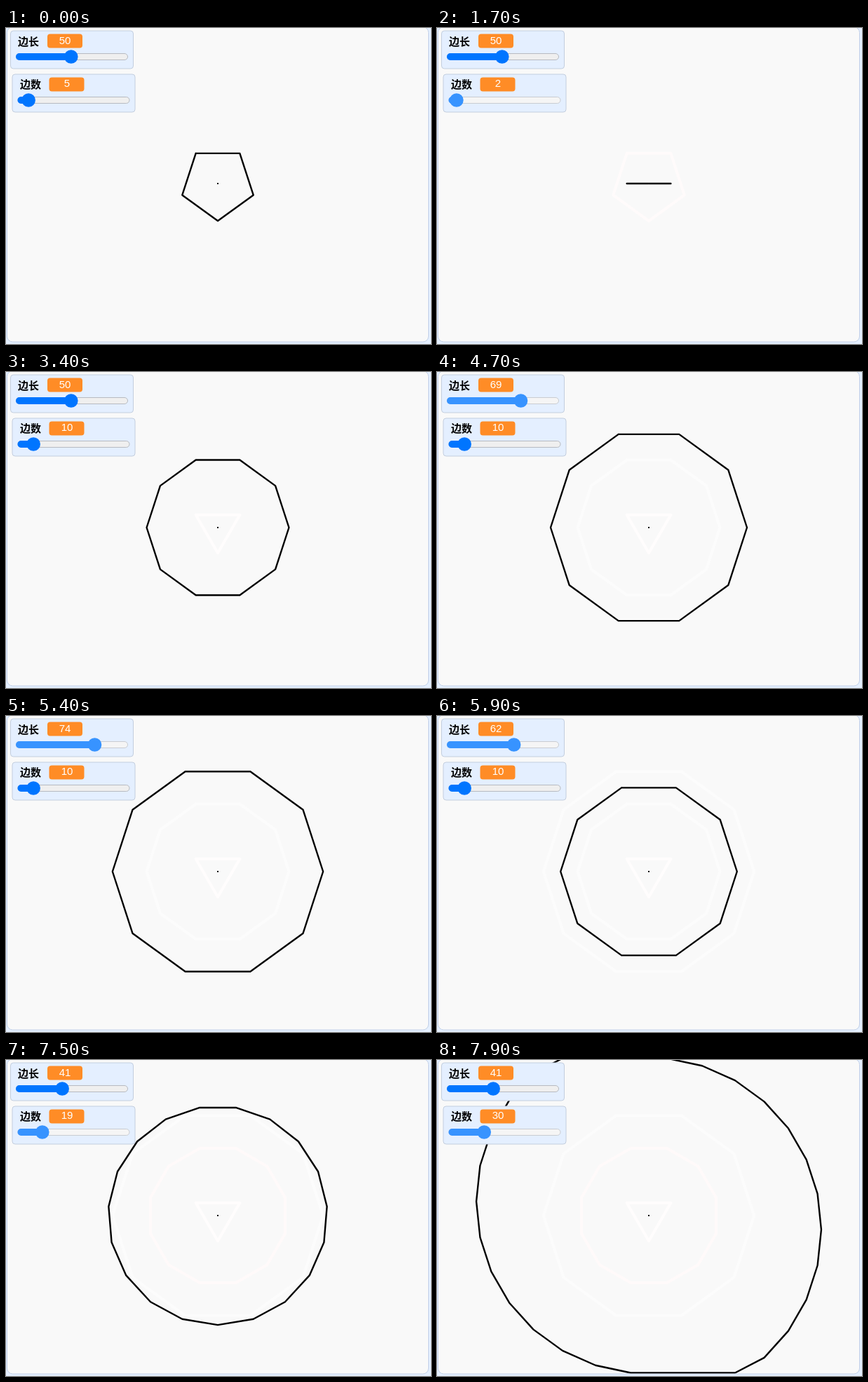
Recreate the animation shown at these times as an HTML page with a canvas. Size 606x451 px, loop 8 s.

```html
<!DOCTYPE html>
<html lang="zh">
<head>
<meta charset="utf-8">
<title>正多边形</title>
<style>
  html, body { margin: 0; width: 606px; height: 451px; overflow: hidden; background: #e5f0ff; }
  body { position: relative; }
  canvas { position: absolute; left: 0; top: 0; }
  .label, .value { position: absolute; line-height: 20px; height: 20px; white-space: nowrap; }
  .label { font: bold 15px/20px "Noto Sans CJK SC", "Noto Sans CJK", sans-serif; color: #000; }
  .value { width: 50px; text-align: center; color: #fff; font: 15px/20px "Liberation Sans", Arial, sans-serif; }
</style>
</head>
<body>
<canvas id="stage" width="606" height="451"></canvas>
<span class="label" style="left:17px;top:9px">边长</span>
<span class="value" id="len" style="left:59px;top:8px">50</span>
<span class="label" style="left:20px;top:70px">边数</span>
<span class="value" id="num" style="left:62px;top:69px">5</span>
<script>
const LOOP = 8000, SCALE = 1.254, CX = 302, CY = 222, FENCE = 179 * SCALE;
const ctx = document.getElementById('stage').getContext('2d');
const lenText = document.getElementById('len');
const numText = document.getElementById('num');

// A run of values, one every 100 ms from the given time
const run = (from, ...values) => values.map((v, i) => [from + i * 100, v]);

const sides = [[0, 5], [1700, 2], ...run(1900, 3, 4, 5), [2600, 7], ...run(2800, 8, 9, 10),
  ...run(7000, 12, 15, 17), ...run(7500, 19, 22, 25, 28, 30)];
const lengths = [[0, 50], ...run(4100, 55, 61, 67), ...run(4700, 69, 71, 73, 75, 77),
  ...run(5400, 74, 71, 69, 67, 65, 62, 57, 52, 47), ...run(6300, 44, 41)];
const lenMode = [[0, 'idle'], [3700, 'hover'], [4100, 'active'], [6400, 'hover'], [6500, 'idle']];
const numMode = [[0, 'idle'], [900, 'hover'], [1700, 'active'], [3300, 'hover'], [3400, 'idle'],
  [6700, 'thumb'], [6900, 'active']];

// Faint traces left on the stage: from, to, sides, length, colour
const traces = [
  [1700, 2100, 5, 50, '#fffbfb'],
  [2000, LOOP, 3, 50, '#fffdfd'],
  [4100, 7000, 10, 50, '#fcfcfc'],
  [5500, LOOP, 10, 74, '#fcfcfc'],
  [7100, LOOP, 12, 41, '#fffafa']
];

const looks = {
  idle: { thumb: '#0075ff', fill: '#0075ff', track: '#efefef', edge: '#b7bac0' },
  hover: { thumb: '#005cc8', fill: '#005cc8', track: '#e5e5e5', edge: '#9fa3aa' },
  active: { thumb: '#3793ff', fill: '#3793ff', track: '#f5f5f5', edge: '#c9ccd1' }
};
looks.thumb = { ...looks.idle, thumb: '#005cc8' };

function at(steps, t) {
  let value = steps[0][1];
  for (const [time, v] of steps) if (time <= t) value = v;
  return value;
}

function box(x, y, w, h, r, fill, stroke) {
  ctx.beginPath();
  ctx.roundRect(x, y, w, h, r);
  if (fill) { ctx.fillStyle = fill; ctx.fill(); }
  if (stroke) { ctx.strokeStyle = stroke; ctx.lineWidth = 1; ctx.stroke(); }
}

// Pen walk, clockwise from the top left; each point is held inside the fence
function polygon(n, length, color, width) {
  const side = length * SCALE, turn = 2 * Math.PI / n;
  const clamp = y => Math.max(CY - FENCE, Math.min(CY + FENCE, y));
  let x = CX - side / 2, y = clamp(CY - side / 2 / Math.tan(Math.PI / n));
  ctx.beginPath();
  ctx.moveTo(x, y);
  for (let i = 0; i < n; i++) {
    x += side * Math.cos(i * turn);
    y = clamp(y + side * Math.sin(i * turn));
    ctx.lineTo(x, y);
  }
  ctx.strokeStyle = color;
  ctx.lineWidth = width;
  ctx.lineCap = ctx.lineJoin = 'round';
  ctx.stroke();
}

function monitor(x, y, w, h, value, mode) {
  const look = looks[mode];
  const left = x + 8, mid = y + 37.5;
  const thumb = left + 10 + 139 * (value - 1) / 99;
  box(x + .5, y + .5, w, h, 4, '#e4efff', '#c3cede');
  box(x + 53, y + 5, 50, 20, 4, '#ff8c26');
  box(left + .5, mid - 4.5, 159, 9, 4.5, look.track, look.edge);
  box(left, mid - 5, thumb - left, 10, 5, look.fill);
  ctx.beginPath();
  ctx.arc(thumb, mid, 9.8, 0, 2 * Math.PI);
  ctx.fillStyle = look.thumb;
  ctx.fill();
}

function draw(t) {
  const n = at(sides, t), length = at(lengths, t);
  ctx.fillStyle = '#e5f0ff';
  ctx.fillRect(0, 0, 606, 451);
  box(1.5, -1.5, 601, 449.5, 8, '#f9f9f9', '#c0cfe8');

  ctx.save();
  ctx.beginPath();
  ctx.roundRect(2, -1, 600, 448.5, 8);
  ctx.clip();
  for (const [from, to, count, size, color] of traces)
    if (t >= from && t < to) polygon(count, size, color, 4);
  polygon(n, length, '#000', 2.4);
  ctx.fillStyle = '#111';
  ctx.fillRect(301, 221, 2, 2);
  ctx.restore();

  monitor(6, 3.5, 175, 54, length, at(lenMode, t));
  monitor(8.5, 65.5, 175, 54, n, at(numMode, t));
  lenText.textContent = length;
  numText.textContent = n;
}

const start = performance.now();
function tick() {
  draw((performance.now() - start) % LOOP);
  requestAnimationFrame(tick);
}
tick();
</script>
</body>
</html>
```
